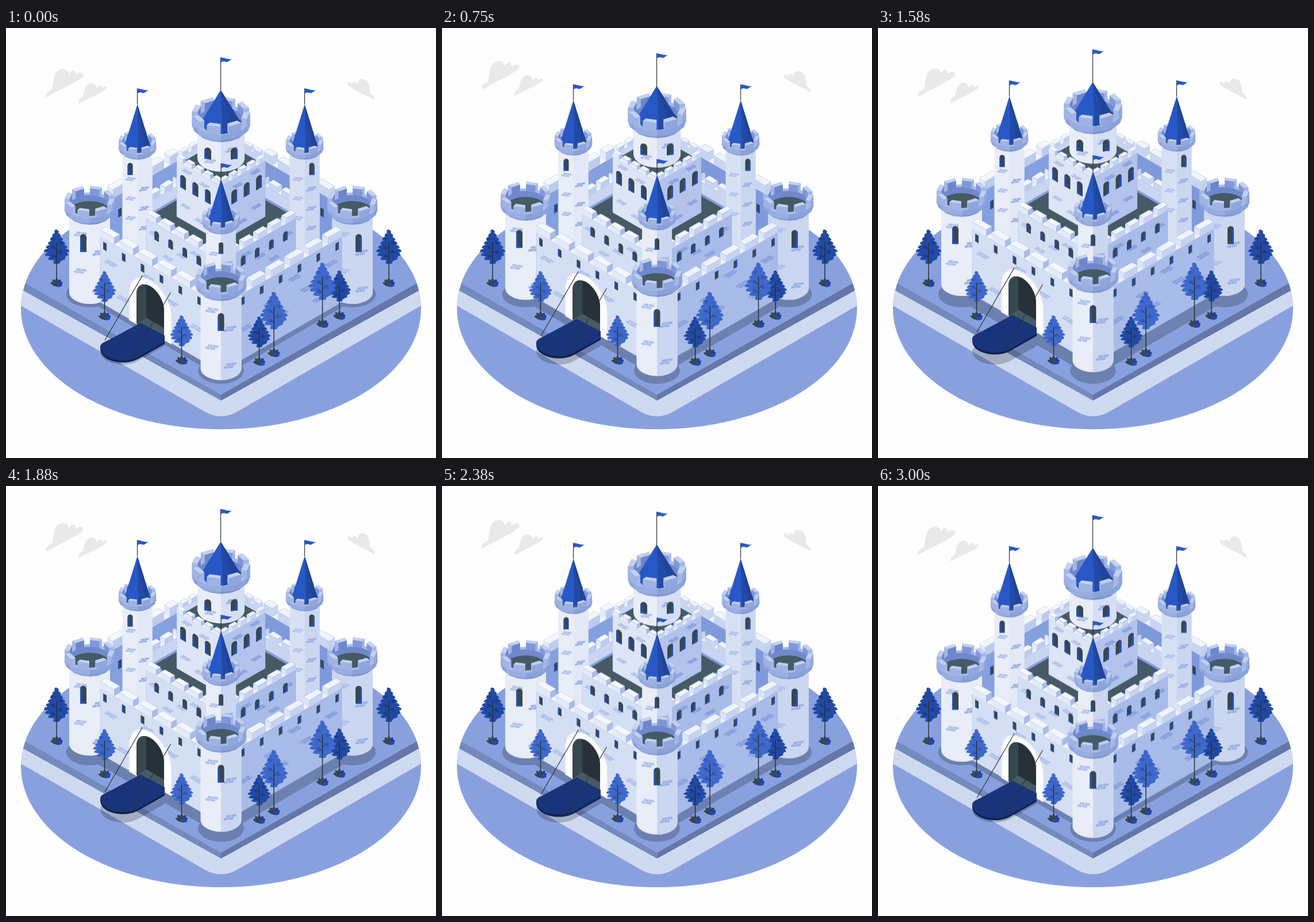
Recreate the animation shown at these times as an HTML page. Size 748x748 px, loop 3040 ms.

```html
<!DOCTYPE html>
<html lang="en">
<head>
<meta charset="utf-8">
<title>Castle</title>
<style>
html,body{margin:0;width:100%;height:100%;overflow:hidden;background:#fefefe}
svg{display:block;width:100vw;height:100vh}
</style>
</head>
<body>
<svg id="stage" viewBox="0 0 748 748"></svg>
<script>
const K = 0.577, MID = 374, RAD = Math.PI / 180;
const DARK = '#455a64', INK = '#263238', PALE = '#e8edf8', COOL = '#cbd7f0';
const LEFT = {face: '#d5dff4', cap: '#e3eaf8', top: '#f4f7fd', end: '#a9bbe8', keep: '#dde5f6',
  back: '#85a0de', backCap: '#bccbee', edge: '#a5b8e7', brick: '#b0c1ea'};
const RIGHT = {face: '#a9bbe8', cap: '#c6d3f1', top: '#f0f4fc', end: '#dce5f7', keep: '#b3c3eb',
  back: '#7f9adb', backCap: '#c9d6f2', edge: '#93a9e1', brick: '#86a0de'};

const range = n => [...Array(n).keys()];
const each = (n, f) => range(n).map(f).join('');
const path = (d, fill, extra = '') => `<path d="${d}" fill="${fill}" ${extra}/>`;
const poly = (pts, fill, extra) =>
  path('M' + pts.map(p => p.map(v => v.toFixed(1)).join(' ')).join('L') + 'Z', fill, extra);
const ell = (x, y, rx, ry, fill) => `<ellipse cx="${x}" cy="${y}" rx="${rx}" ry="${ry}" fill="${fill}"/>`;
const line = (x1, y1, x2, y2, w = 1.2) =>
  path(`M${x1} ${y1}L${x2} ${y2}`, 'none', `stroke="${INK}" stroke-width="${w}"`);
const group = (t, s) => `<g transform="${t}">${s}</g>`;
const hair = c => `stroke="${c}" stroke-width=".5"`;
const both = f => f(LEFT) + group('matrix(-1 0 0 1 748 0)', f(RIGHT));

// Battlement; dir 1: wall seen from outside, dir -1: from inside
function wall(c, {x, y, step, w, h, d, x1, tall, dir = 1, fill}) {
  const at = (px, dy) => [px, y + dy + dir * K * (px - x)];
  const back = ([px, py]) => [px + dir * d, py - K * d];
  const [face, cap] = dir > 0 ? [fill || c.face, c.cap] : [fill || c.back, c.backCap];
  const a = at(x, h), b = at(x1, h);
  let s = poly([a, b, back(b), back(a)], c.top)
    + poly([a, b, at(x1, tall), at(x, tall)], face, hair(c.edge));
  const steps = range(Math.floor((x1 - x) / step) + 1);
  if (dir < 0) steps.reverse();
  for (const i of steps) {
    const l = x + i * step, r = Math.min(l + w, x1);
    const [p, q, u, v] = [at(l, 0), at(r, 0), at(r, h), at(l, h)];
    const [e, f] = dir > 0 ? [q, u] : [p, v];
    s += poly([e, back(e), back(f), f], dir > 0 ? c.end : c.cap) + poly([p, q, u, v], cap)
      + poly([p, q, back(q), back(p)], c.top, hair(c.edge));
  }
  return s;
}

function win(x, y, w, h, skew = 0, round = true, flip = false) {
  const r = w / 2, top = -h / 2 + (round ? r : 0);
  const arch = round ? `A${r} ${r} 0 0 1 ${r} ${top}` : `H${r}`;
  return group(`translate(${x} ${y}) skewY(${skew}) scale(${flip ? -1 : 1} 1)`,
    path(`M${-r} ${h / 2}V${top}${arch}V${h / 2}Z`, '#37474f')
    + path(`M${-r} ${h / 2}V${top}h${w * .3}V${h / 2 - w * .4}L${r} ${h / 2}Z`, '#2350b4'));
}
const winRow = (n, x, y, step, w, h, round) =>
  each(n, i => win(x + step * i, y + K * step * i, w, h, 30, round));

const BRICK = 'M-7 -4.500h8v4h-8zM1.800 -4.500h9v4h-9zM-11 0h7v4h-7zM-3.200 0h9v4h-9z';
const brick = (x, y, skew, fill, size) =>
  group(`translate(${x} ${y}) skewY(${skew}) scale(${size})`, path(BRICK, fill));
// Golden-ratio spread over a sloping strip
const wallBricks = (c, n, x, y, w, h, size = 1) => each(n, i => {
  const dx = w * (i + .5) / n;
  return brick(x + dx, y + K * dx + h * ((i * .618 + .2) % 1), 30, c.brick, size);
});
// Alternate sides going down a tower
const towerBricks = (cx, r, top, step, n, size = 1) => each(n, i => {
  const side = i % 2 ? 1 : -1;
  return brick(cx + side * r * .45, top + i * step, -8 * side, side < 0 ? LEFT.brick : '#9cb1e5', size);
});

function body(cx, r, top, bottom, c1, c2) {
  const y = bottom - r * .57, arc = `A${r} ${r * .57} 0 0`;
  return path(`M${cx - r} ${top}V${y}${arc} 0 ${cx + r} ${y}V${top}Z`, c1)
    + path(`M${cx} ${top}V${bottom}${arc} 0 ${cx + r} ${y}V${top}Z`, c2);
}

function crown(cx, cy, rx, inside = '') {
  const H = rx * .27, band = rx * .45, foot = rx * .6, inR = .8;
  const pt = (a, r, y) => [cx + rx * r * Math.cos(a * RAD), cy + y + rx * r * .523 * Math.sin(a * RAD)];
  const ix = rx * inR, iy = ix * .523, drop = rx * .24;
  const half = Math.sqrt(1 - (drop / 2 / iy) ** 2) * ix, fy = cy + H + drop / 2;
  let back = ell(cx, cy + H, rx, rx * .523, '#a9bbe8') + ell(cx, cy + H, ix, iy, '#7089cd')
    + path(`M${cx - half} ${fy}A${ix} ${iy} 0 0 1 ${cx + half} ${fy}A${ix} ${iy} 0 0 1 ${cx - half} ${fy}Z`, DARK);
  let front = '', skirt = '';
  for (let a = 0; a < 180; a += 22.5) {
    const b = a + 22.5, [c, u] = a >= 90 ? ['#98ade1', '#8a9fd6'] : ['#8aa1da', '#7b92cd'];
    skirt += poly([pt(a, 1, band), pt(b, 1, band), pt(b, .84, foot), pt(a, .84, foot)], u, hair(u))
      + poly([pt(a, 1, H), pt(b, 1, H), pt(b, 1, band), pt(a, 1, band)], c, hair(c));
  }
  const mids = range(8).map(i => 15 + 45 * i).sort((m, n) => Math.sin(m * RAD) - Math.sin(n * RAD));
  for (const m of mids) {
    const a = m - 14, b = m + 14, near = Math.sin(m * RAD) > 0, west = Math.cos(m * RAD) < 0;
    const side = (p, r, q, t, c) => poly([pt(p, r, 0), pt(q, t, 0), pt(q, t, H), pt(p, r, H)], c);
    const outer = side(a, 1, b, 1, west ? '#9fb3e4' : '#8fa6de');
    const inner = side(a, inR, b, inR, west ? '#6c86cc' : '#8098d8');
    const ends = side(a, 1, a, inR, '#a4b6e6') + side(b, 1, b, inR, '#a4b6e6');
    const s = (near ? inner + ends + outer : outer + ends + inner)
      + poly([pt(a, 1, 0), pt(b, 1, 0), pt(b, inR, 0), pt(a, inR, 0)], '#c3d1ef');
    if (near) front += s; else back += s;
  }
  return back + inside + skirt + front;
}

function cone(cx, tip, by, r) {
  const rim = [180, 130, 84, 48, 0].map(a => [cx + r * Math.cos(a * RAD), by + r * .52 * Math.sin(a * RAD)]);
  const t = [cx, tip];
  return poly([t, ...rim], '#2858c5') + poly([t, ...rim.slice(2)], '#224aa6') + poly([t, ...rim.slice(3)], '#1f4499');
}

const flag = (cx, y, foot) => line(cx, y, cx, foot)
  + group(`translate(${cx} ${y})`, path('M0 1C4 -1 9 4 20 3C14 5 14 9 9 8C5 6 3 7 0 9Z', '#2858c5'));

const bigTower = (cx, top, c1, c2, dx = 0, dy = 77) => body(cx, 35.5, top + 20, top + 183, c1, c2)
  + towerBricks(cx, 35.5, top + 62, 32, 4) + crown(cx, top, 43.5) + win(cx + dx, top + dy, 11, 31, 0, true, dx > 0);

const slimTower = (cx, top, c1, c2) => body(cx, 26, top + 20, top + 205, c1, c2)
  + towerBricks(cx, 26, top + 68, 17, 6, .8)
  + crown(cx, top, 32.5, cone(cx, top - 62, top + 9, 22)) + flag(cx, top - 90, top - 62);

function gate() {
  const arch = (r, spring, base) => {
    const x = 251 - r, curve = range(31).map(i => {
      const a = Math.PI * (1 - i / 30), u = r + r * Math.cos(a);
      return [x + u, spring + K * u - 1.155 * r * Math.sin(a)];
    });
    return [[x, base], ...curve, [x + 2 * r, base + 2 * r * K]];
  };
  const hole = arch(24, 463, 514);
  return poly(arch(37, 460, 508), '#f0f1f3') + poly(arch(35, 461, 508), '#fdfdfd') + poly(hole, INK)
    + poly([...hole.slice(0, 14), [244, 456], [244, 505], [227, 514]], '#37474f')
    + poly([[227, 515], [244, 504], [275, 522], [275, 542]], DARK);
}

const BRIDGE = 'M234 513L276 535V546L230 572C207 585 166 577 164 556C163 550 169 547 178 543Z';
const bridge = group('translate(0 3.500)', path(BRIDGE, '#0f2050')) + path(BRIDGE, '#193478')
  + line(237, 431, 172, 543) + line(286.5, 460, 219, 575);

function castle() {
  let s = both(c => wall(c, {x: 153, y: 300, step: 33, w: 23, h: 15, d: 10, x1: 300, tall: 92, dir: -1})
    + win(271, 277, 6, 13, -30, false) + win(198, 321, 6, 14, -30, false));
  s += bigTower(145.5, 297, PALE, PALE, -11) + bigTower(602.5, 297, COOL, COOL, 11);

  // Courtyard and its rear towers
  s += poly([[258, 322], [MID, 397], [490, 322], [MID, 255]], DARK);
  s += both(c => wall(c, {x: 254, y: 290, step: 22, w: 15, h: 10, d: 8, x1: 300, tall: 30, dir: -1, fill: '#cad6f1'}));
  s += slimTower(228.5, 195, PALE, '#e3e9f7') + slimTower(519.5, 195, '#d8e1f4', COOL)
    + win(216, 245, 9, 21) + win(532, 245, 9, 21, 0, true, true);

  // Keep
  s += poly([[306, 233], [MID, 272], [442, 233], [MID, 194]], DARK);
  s += both(c => wall(c, {x: 307, y: 216, step: 15.8, w: 10.5, h: 7, d: 6, x1: 350, tall: 17, dir: -1, fill: '#cad6f1'}));
  s += body(MID, 41, 175, 250, PALE, '#d6dff4') + towerBricks(MID, 41, 232, -20, 2, .9)
    + win(351, 218, 12, 20, 8) + win(397, 218, 12, 20, -8, true, true)
    + crown(MID, 146, 50.5, cone(373.5, 108, 166, 36)) + flag(373.5, 51, 109);
  s += both(c => wall(c, {x: 297, y: 223, step: 15.8, w: 10.5, h: 8, d: 6, x1: MID, tall: 105, fill: c.keep})
    + wallBricks(c, 2, 300, 240, 60, 10, .8) + wallBricks(c, 2, 300, 300, 50, 18, .8)
    + winRow(3, 308, 268, 21.5, 10, 23));

  // Inner ward
  s += both(c => wall(c, {x: 244, y: 321, step: 24.5, w: 17, h: 10, d: 8, x1: MID, tall: 129})
    + wallBricks(c, 4, 246, 343, 96, 45, .85) + winRow(4, 262, 362, 24.5, 8, 16));
  s += slimTower(MID, 325, PALE, COOL) + win(MID, 383, 8, 20);

  // Outer walls
  s += both(c => wall(c, {x: 164, y: 351, step: 33, w: 24, h: 12, d: 10, x1: 355, tall: 126})
    + wallBricks(c, 8, 172, 388, 170, 80) + winRow(6, 172, 380, 32.8, 6, 13, false));
  return s + gate() + bigTower(MID, 429.5, PALE, COOL, 0, 82) + bridge;
}

function bush(x, y) {
  const leaf = a => group(`translate(${x} ${y}) rotate(${a})`, ell(0, -5, 2.7, 6, a % 4 ? '#1d3f93' : '#37474f'));
  return [-76, 74, -40, 42, 0].map(leaf).join('') + ell(x + 3, y + 1, 7, 3.5, '#224aa6') + ell(x - 3, y, 4, 3, '#37474f');
}

// Conifer outline: toothed tiers widening to two thirds, then closing
function conifer(fill, shade) {
  const H = 54, n = 9, half = t => 20 * (t < .66 ? t / .66 : 1 - .75 * ((t - .66) / .34) ** 2);
  const side = range(n).map(i => {
    const t = (i + 1) / n;
    return {w: half(t), y: H * t - 1.5, from: H * i / n};
  });
  let d = 'M0 0';
  for (const {w, y, from} of side) d += `Q${w} ${from + 1} ${w} ${y}L${w * .8} ${y + 1}`;
  for (const {w, y, from} of side.reverse()) d += `L${-w * .8} ${y + 1}L${-w} ${y}Q${-w} ${from + 1} ${-w * .7} ${from}`;
  const marks = each(5, i => path(`M${i % 2 ? 3 : -9} ${12 + 7 * i}q5 -2 7 3q-5 4 -7 -3z`, shade));
  const twigs = each(3, i => line(0, 32 + 6 * i, i % 2 ? 6 : -6, 26 + 6 * i, .8));
  return path(d + 'Z', fill) + marks + twigs;
}

function tree(x, foot, size, dark) {
  const y = foot - 84 * size ** 1.5;
  return group(`translate(${x} ${y}) scale(${size})`, dark ? conifer('#2249a4', '#1b3c8c') : conifer('#3e68ca', '#325abb'))
    + line(x, y + 20 * size, x, foot, 1.5) + bush(x, foot - 3);
}

const trees = tree(88, 449, 1.11, true) + tree(666, 449, 1.11, true)
  + tree(171.5, 507, 1) + tree(580, 506, 1, true) + tree(550.5, 520, 1.21)
  + tree(466, 571, 1.21) + tree(305.5, 584, 1) + tree(440.5, 586, 1, true);

const slab = (y, tip, fill) => poly([[0, y], [MID, tip], [748, y], [748, 200], [0, 200]], fill);
const land = '<clipPath id="disc"><ellipse cx="374" cy="488" rx="348" ry="210"/></clipPath><g clip-path="url(#disc)">'
  + path('M0 200H748V748H0Z', '#88a1de')
  + path('M0 468L345 667Q374 684 403 667L748 468V300H0Z', '#cfdaf1')
  + slab(440, 648, '#738abc') + poly([[748, 440], [MID, 648], [MID, 300]], '#6577a9')
  + slab(425, 638, '#88a1de') + '</g>';

const shadow = '<g opacity=".2">' + ell(MID, 596, 40, 23) + ell(145.5, 463, 41, 23) + ell(602.5, 463, 41, 23)
  + poly([[160, 484], [MID, 608], [588, 484], [MID, 360]], '#000')
  + group('translate(0 7)', path(BRIDGE, '#000')) + '</g>';

const clouds = path('M70 121C67 115 73 110 80 107C84 96 80 75 97 71.500C104 70 109 75 110 81C114 70 122 72 121 82C127 74 137 77 134 84C131 90 92 108 70 121Z'
  + 'M127 132C124 126 129 122 134 119C136 108 139 96 149 96C155 96 157 101 158 105C163 97 168 99 167 105C174 98 177 102 174 106C170 111 141 124 127 132Z'
  + 'M641 125.500C643 120 637 116 633 113C634 100 630 90 621 89C614 88 612 93 611 98C607 91 602 93 603 98C597 92 592 95 595 99C600 106 625 116 641 125.500Z', '#e8eaea');

document.getElementById('stage').innerHTML =
  `<g id="clouds">${clouds}</g>${land}${shadow.replace(/undefined/g, '#000')}<g id="castle">${castle()}</g>${trees}`;

const bob = (id, rise, duration) => document.getElementById(id).animate(
  [0, -rise, 0].map(y => ({transform: `translateY(${y}px)`})), {duration, iterations: Infinity});
bob('castle', 14.5, 3040);
bob('clouds', 14, 1520);
</script>
</body>
</html>
```
